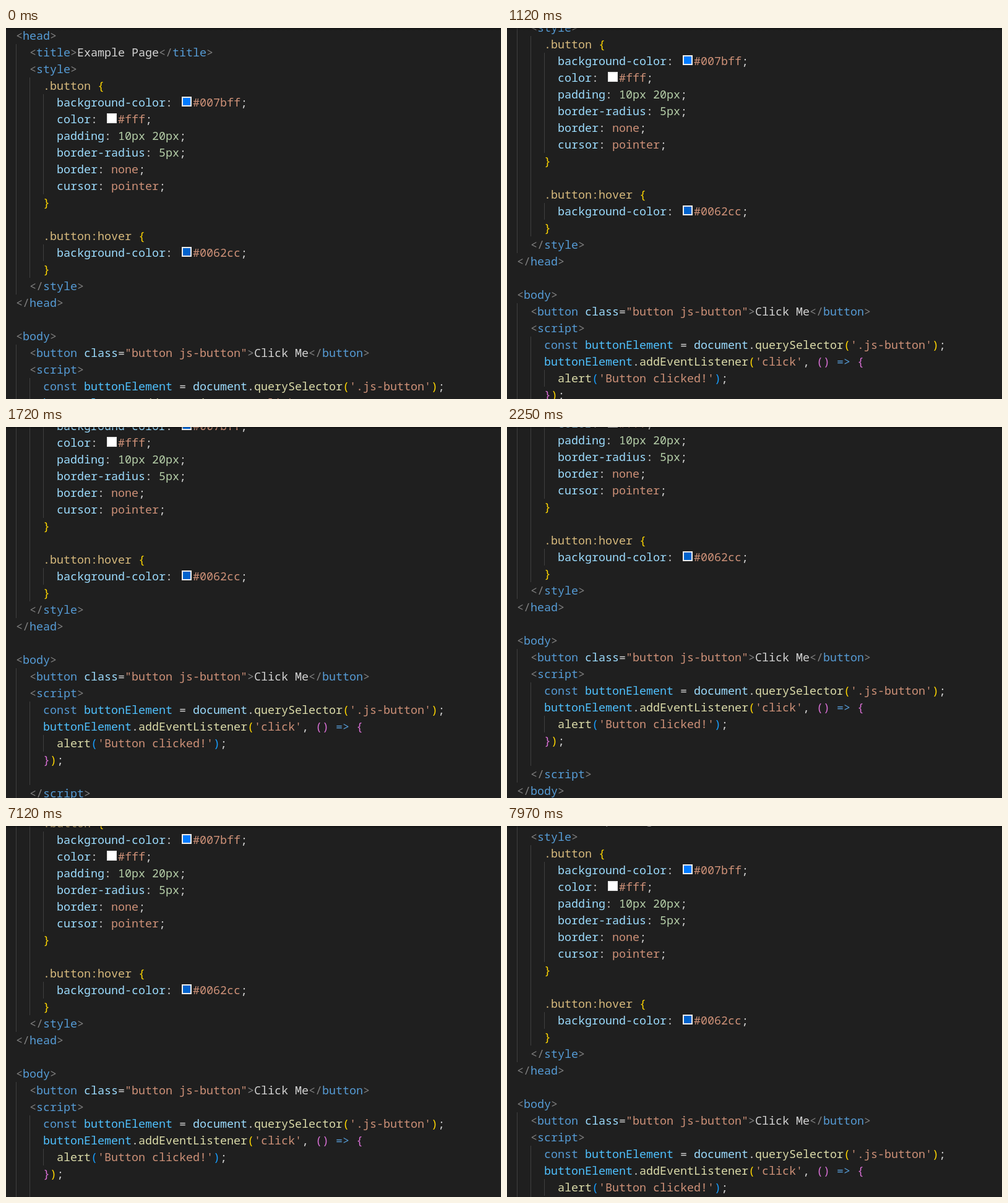
An HTML page with a canvas that plays this animation: 800 px wide and 600 px high, repeating every 8000 ms.

```html
<!DOCTYPE html>
<html lang="en">
<head>
<meta charset="utf-8">
<title>Scrolling code</title>
<style>
  html, body { margin: 0; width: 100%; height: 100%; overflow: hidden; background: #1f1f1f; }
  canvas { display: block; }
</style>
</head>
<body>
<canvas id="stage" width="800" height="600"></canvas>
<script>
const ctx = document.getElementById('stage').getContext('2d');
const LOOP = 8000, LEFT = 16, CELL = 11, ROW = 27, BASE = 19, NOTCH = 6.12;

const colors = {
  g: '#808080', t: '#569cd6', w: '#d4d4d4', s: '#d7ba7d', p: '#9cdcfe',
  v: '#ce9178', n: '#b5cea8', c: '#4fc1ff', f: '#dcdcaa',
  1: '#ffd700', 2: '#da70d6', 3: '#179fff'
};

// "~x" switches to colour x, "~#" reserves two cells for a colour swatch
const lines = [
  '~g<~thead~g>',
  '  ~g<~ttitle~g>~wExample Page~g</~ttitle~g>',
  '  ~g<~tstyle~g>',
  '    ~s.button ~1{',
  '      ~pbackground-color~w: ~#~v#007bff~w;',
  '      ~pcolor~w: ~#~v#fff~w;',
  '      ~ppadding~w: ~n10px 20px~w;',
  '      ~pborder-radius~w: ~n5px~w;',
  '      ~pborder~w: ~vnone~w;',
  '      ~pcursor~w: ~vpointer~w;',
  '    ~1}',
  '',
  '    ~s.button:hover ~1{',
  '      ~pbackground-color~w: ~#~v#0062cc~w;',
  '    ~1}',
  '  ~g</~tstyle~g>',
  '~g</~thead~g>',
  '',
  '~g<~tbody~g>',
  '  ~g<~tbutton ~pclass~w=~v"button js-button"~g>~wClick Me~g</~tbutton~g>',
  '  ~g<~tscript~g>',
  "    ~tconst ~cbuttonElement~w = ~pdocument~w.~fquerySelector~1(~v'.js-button'~1)~w;",
  "    ~cbuttonElement~w.~faddEventListener~1(~v'click'~w, ~2() ~t=> ~2{",
  "      ~falert~3(~v'Button clicked!'~3)~w;",
  '    ~2}~1)~w;',
  '',
  '  ~g</~tscript~g>',
  '~g</~tbody~g>'
];

// indent guides: column, first row, row after the last
const guides = [
  [0, 1, 16], [2, 3, 15], [4, 4, 10], [4, 13, 14],
  [0, 19, 27], [2, 21, 26], [4, 23, 24]
];

// wheel runs: first notch time, last notch time, notches, direction
const runs = [
  [500, 1120, 11, 1], [1180, 1250, 2, 1], [1310, 1720, 7, 1],
  [1850, 1990, 3, 1], [2120, 2250, 2, 1],
  [6460, 6520, 2, -1], [6602, 7120, 7, -1], [7250, 7320, 2, -1],
  [7510, 7710, 4, -1], [7910, 7970, 2, -1]
];

function scrollAt(t) {
  let notches = 0;
  for (const [from, to, count, dir] of runs) {
    if (t < from) break;
    const done = 1 + Math.floor((t - from) / (to - from) * (count - 1) + 1e-6);
    notches += dir * Math.min(count, done);
  }
  return Math.round(notches * NOTCH);
}

function swatch(x, y, color) {
  ctx.fillStyle = '#eeeeee';
  ctx.fillRect(x + 4, y - 16, 16, 16);
  ctx.fillStyle = color;
  ctx.fillRect(x + 6, y - 14, 12, 12);
}

function drawLine(line, y) {
  const parts = line.split('~');
  let x = LEFT + parts[0].length * CELL;
  parts.slice(1).forEach((part, i) => {
    if (part[0] === '#') {
      swatch(x, y, parts[i + 2].slice(1));
      x += 2 * CELL;
      return;
    }
    const text = part.slice(1);
    ctx.fillStyle = colors[part[0]];
    ctx.fillText(text, x, y);
    x += text.length * CELL;
  });
}

const shade = ctx.createLinearGradient(0, 0, 0, 4);
shade.addColorStop(0, 'rgba(0,0,0,0.4)');
shade.addColorStop(1, 'rgba(0,0,0,0)');

function draw(t) {
  const top = scrollAt(t);
  ctx.fillStyle = '#1f1f1f';
  ctx.fillRect(0, 0, 800, 600);

  ctx.fillStyle = '#404040';
  for (const [col, from, to] of guides) {
    ctx.fillRect(LEFT + col * CELL, from * ROW - 1 - top, 1, (to - from) * ROW);
  }

  ctx.font = CELL / 0.6 + 'px "Noto Sans Mono", "DejaVu Sans Mono", monospace';
  ctx.textBaseline = 'alphabetic';
  lines.forEach((line, i) => drawLine(line, i * ROW + BASE - top));

  ctx.fillStyle = shade;
  ctx.fillRect(0, 0, 800, 4);
}

const start = performance.now();
function tick() {
  draw((performance.now() - start) % LOOP);
  requestAnimationFrame(tick);
}
tick();
</script>
</body>
</html>
```
